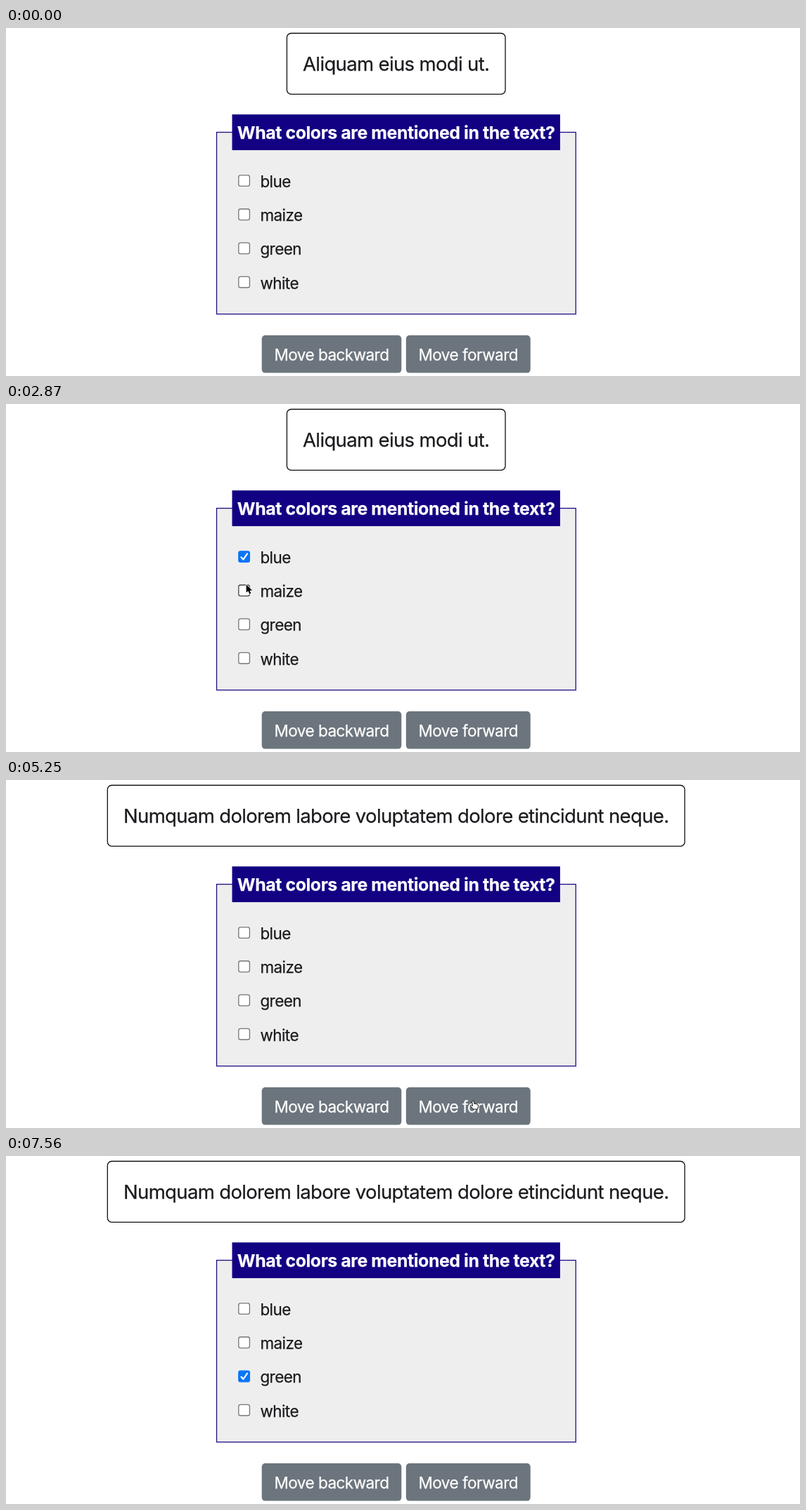
An HTML page for the animation above (7700 ms loop, 1129 by 496 pixels).

```html
<!DOCTYPE html>
<html lang="en">
<head>
<meta charset="utf-8">
<title>Color survey</title>
<style>
  html, body { margin: 0; width: 100%; height: 100%; overflow: hidden; background: #fff; }
  svg { display: block; }
  text {
    font-family: Inter, "Open Sans", sans-serif;
    font-optical-sizing: none;
    letter-spacing: -0.0235em;
    fill: #1a1b1e;
    stroke: #1a1b1e;
    stroke-width: 0.25px;
  }
  .mid { text-anchor: middle; }
  .title { font-size: 27.5px; }
  .legend { font-size: 24.8px; font-weight: 700; letter-spacing: -0.0155em; }
  .label { font-size: 22.4px; }
  .button { font-size: 22.5px; }
  .legend, .button { fill: #fff; stroke: #fff; }
</style>
</head>
<body>
<svg id="stage" width="1129" height="496" viewBox="0 0 1129 496"></svg>
<script>
const LOOP = 7700, STEP = 70, MID = 554.7;
const NEXT_PAGE = 5040;
const stage = document.getElementById('stage');

function set(el, attrs) {
  for (const k in attrs) el.setAttribute(k, attrs[k]);
}
function add(tag, attrs, parent = stage) {
  const el = document.createElementNS('http://www.w3.org/2000/svg', tag);
  set(el, attrs);
  parent.appendChild(el);
  return el;
}
function label(str, x, y, cls) {
  const el = add('text', { x, y, class: cls });
  el.textContent = str;
  return el;
}
function rect(x, y, width, height, rx, fill, stroke = 'none') {
  return add('rect', { x, y, width, height, rx, fill, stroke, 'stroke-width': 1.3 });
}
function button(str, x, width) {
  const el = rect(x, 438, width, 53.6, 5, '#6c757d');
  label(str, x + width / 2, 474, 'button mid');
  return el;
}
const show = (el, on) => el.setAttribute('visibility', on ? 'visible' : 'hidden');
const rowY = i => 217.6 + i * 48.2;

// Static page
const titleBox = rect(0, 7.5, 0, 86.8, 6, '#fff', '#101010');
const title = label('', MID, 61.3, 'title mid');
rect(299.5, 148.6, 510.7, 259.1, 0, '#eee', '#1b0f80');
rect(321.5, 123.2, 466.4, 50.9, 0, '#130183');
label('What colors are mentioned in the text?', MID, 158, 'legend mid');

const rows = ['blue', 'maize', 'green', 'white'].map((name, i) => {
  const y = rowY(i);
  const box = rect(330.8, y - 7.8, 15.6, 15.6, 2.6, '#fff', '#767676');
  const tick = add('path', {
    d: `M334.5 ${y + .8}l2.9 3.2l5.6 -8.2`, fill: 'none', stroke: '#fff',
    'stroke-width': 2.2, 'stroke-linecap': 'round', 'stroke-linejoin': 'round'
  });
  label(name, 361.4, y + 9.4, 'label');
  return { y, box, tick };
});

button('Move backward', 363.7, 198.6);
const forward = button('Move forward', 568.8, 176.9);

// Pointer
const ring = add('g', { fill: 'none' });
const rings = [['#fff', 3], ['#1c1c1c', 1.3]].map(([stroke, w]) =>
  add('circle', { stroke, 'stroke-width': w }, ring));
const arrow = add('path', {
  d: 'M0 0V11.6L2.7 9.2L4.6 13.5L6.7 12.6L4.9 8.4H8.5Z',
  fill: '#000', stroke: '#fff', 'stroke-width': 1.4,
  'stroke-linejoin': 'round', 'paint-order': 'stroke'
});
const hand = add('path', {
  d: 'M-1.4 1Q0 -1 1.2 1L2 4.6Q5 3.6 6.2 5.8Q8 5.6 7.6 7.6L6.6 12.2H0.4L-3.6 7.4Q-3.4 5.5 -1.6 6.6L-0.4 7.4Z',
  fill: '#fff', stroke: '#151515', 'stroke-linejoin': 'round'
});

const onBox = i => ({ x: 341, y: rowY(i) - 1 });
const onForward = { x: 664, y: 457 };
const enter = { x: 633, y: 436 }, exit = { x: 815, y: 500 };

const moves = [
  { from: 140, until: 560, to: { x: 553, y: 227 } },
  { from: 630, until: 1470, to: { x: 344, y: 240 } },
  { from: 1470, until: 1820, to: { x: 343, y: 219 } },
  { from: 2380, until: 3150, to: onBox(1) },
  { from: 3150, until: 3500, to: onBox(2) },
  { from: 3920, until: 4550, to: onForward },
  { from: 5460, until: 5980, to: onBox(2) },
  { from: 6510, until: 7000, to: exit }
];
const clicks = [
  { at: 2310, r: 18 }, { at: 3780, r: 18 },
  { at: 4900, r: 24.5 }, { at: 6230, r: 18 }
];

// Smooth moves whose vertical part runs ahead of the horizontal
function pointerAt(t) {
  let { x, y } = enter;
  for (const { from, until, to } of moves) {
    if (t < from) break;
    const u = Math.min(1, (t - from) / (until - from));
    const e = u * u * (3 - 2 * u);
    x += (to.x - x) * e;
    y += (to.y - y) * (1 - (1 - e) ** 1.5);
  }
  return { x, y };
}

function draw(now) {
  const t = Math.floor(now % LOOP / STEP) * STEP;
  const second = t >= NEXT_PAGE;
  const width = second ? 820.8 : 310.6;
  set(titleBox, { x: MID - width / 2, width });
  title.textContent = second
    ? 'Numquam dolorem labore voluptatem dolore etincidunt neque.'
    : 'Aliquam eius modi ut.';

  const visible = t >= 210 && t < 7000;
  const p = pointerAt(t);
  const checked = second
    ? [false, false, t >= 6370, false]
    : [t >= 2450, false, t >= 3850, false];
  rows.forEach(({ y, box, tick }, i) => {
    const over = visible && p.x > 330 && p.x < 425 && Math.abs(p.y - y) < 12;
    const on = checked[i];
    set(box, {
      fill: on ? '#0b75f8' : '#fff',
      stroke: on ? '#0b75f8' : over ? '#454545' : '#767676'
    });
    show(tick, on);
  });

  const onButton = t > 3920 && t < 6000 && p.x > 569 && p.y > 438;
  set(forward, { fill: onButton && !second ? '#5c636a' : '#6c757d' });
  show(arrow, visible && !onButton);
  show(hand, onButton);

  const click = clicks.find(c => t >= c.at && t < c.at + STEP);
  show(ring, click);
  if (click) rings.forEach(c => set(c, { r: click.r }));
  const transform = `translate(${p.x} ${p.y})`;
  [arrow, hand, ring].forEach(el => set(el, { transform }));
}

const start = performance.now();
function frame() {
  draw(performance.now() - start);
  requestAnimationFrame(frame);
}
frame();
</script>
</body>
</html>
```
